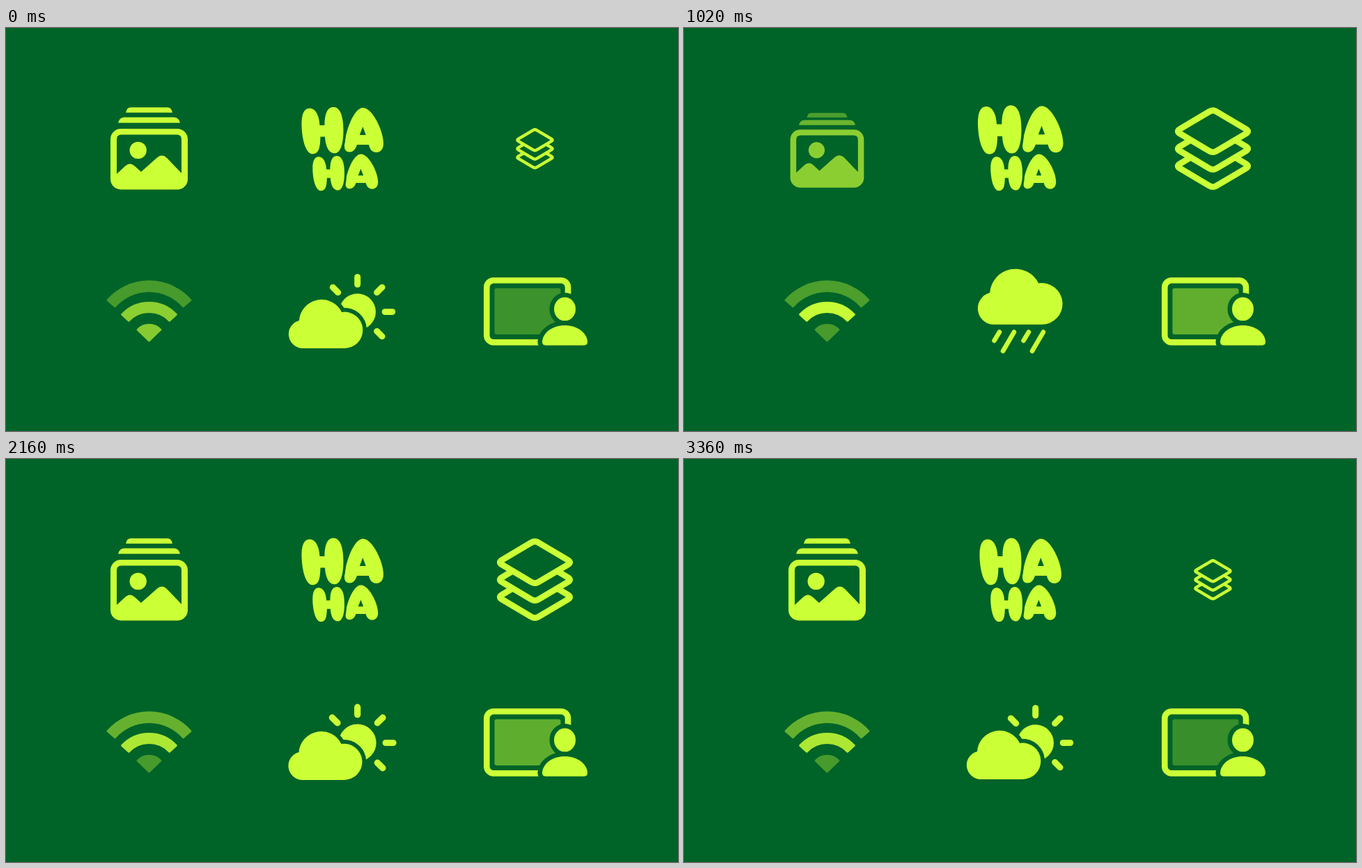
Write an HTML page that moves like this. It is 965 by 580 pixels and loops after 3.39 s.

```html
<!DOCTYPE html>
<html lang="en">
<head>
<meta charset="utf-8">
<title>Icon motion</title>
<style>
  html, body { margin: 0; width: 100%; height: 100%; overflow: hidden; background: #006428; }
  svg { display: block; width: 965px; height: 580px; fill: #cbff36; }
  .bg { fill: #006428; }
  .line { fill: none; stroke: #cbff36; stroke-linecap: round; }
  .gap { stroke: #006428; paint-order: stroke; }
  .sheet { fill: #006428; stroke: #cbff36; stroke-width: 8.8; stroke-linejoin: round; }
  .band { stroke: #cbff36; stroke-width: 3; stroke-linejoin: round; }
</style>
</head>
<body>
<svg viewBox="0 0 965 580">
  <defs>
    <path id="H" d="M424.5 138C424.5 124 428 115.5 436 115.5C445 115.5 450 127 450.5 140H457.5C457.5 125 461 113.8 470 113.8C480 113.8 484.5 127 484.5 147C484.5 168 480 180.3 472 180.3C463 180.3 459 170 458 156.5H451.5C451 171 450 181.3 440 181.3C430 181.3 424.5 158 424.5 138Z"/>
    <path id="A" fill-rule="evenodd" d="M512.8 114.8C526 114.8 542 148 542 166C542 174 538 179 532 179C526 179 522.5 175 521 168H504C502 174 499 178.5 493.5 178.5C488.5 178.5 486 175 486 170C486 155 498 114.8 512.8 114.8ZM512.3 142L507.8 154H516.8Z"/>
    <path id="sheet" d="M-47.5 3.2Q-52.8 0-47.5-3.2L-5.3-28.3Q0-31.5 5.3-28.3L47.5-3.2Q52.8 0 47.5 3.2L5.3 28.3Q0 31.5-5.3 28.3Z"/>
    <path id="ray" d="M0-39.5V-50"/>
  </defs>

  <g class="photo">
    <rect x="150" y="145" width="111" height="87.5" rx="15"/>
    <path class="bg" d="M159 210V160Q159 153.5 165.5 153.5H245.5Q252 153.5 252 160V209L231 187Q224 180.5 217 186.5L194 207L184 198Q178 193 172 198Z"/>
    <circle cx="189.7" cy="176" r="12.2"/>
  </g>
  <path class="photo" d="M161 136.5Q163 128.5 170 128.5H241Q248 128.5 250 136.5Z"/>
  <path class="photo" d="M172 121.7Q173.500 114.3 179 114.3H232Q237.500 114.3 239 121.7Z"/>

  <g class="letter"><use href="#A" transform="translate(487.5 181.6) scale(.835 .78) translate(-486 -114.8)"/></g>
  <g class="letter"><use href="#H" class="gap" stroke-width="8" transform="translate(440.3 184) scale(.762 .745) translate(-424.5 -113.8)"/></g>
  <g class="letter"><use href="#A"/></g>
  <g class="letter"><use href="#H" class="gap" stroke-width="7"/></g>

  <g class="layer"><use href="#sheet" class="sheet" y="25"/></g>
  <g class="layer"><use href="#sheet" class="sheet"/></g>
  <g class="layer"><use href="#sheet" class="sheet" y="-25"/></g>

  <path class="band"/><path class="band"/><path class="band"/>

  <g id="sun">
    <circle r="26.3"/>
    <g class="line" stroke-width="9">
      <use href="#ray" transform="rotate(-45)"/><use href="#ray"/><use href="#ray" transform="rotate(45)"/>
      <use href="#ray" transform="rotate(90)"/><use href="#ray" transform="rotate(135)"/>
    </g>
  </g>
  <path id="drops" class="line" stroke-width="6.5" d="M453 437.500L445.500 450M474 437.500L458 465M495 437.500L487.500 450M516 437.500L500 465"/>
  <path id="cloud" class="gap" stroke-width="11.5" d="M-32.5 35.3A20.4 20.4 0 0 1-38-4.8A32.3 32.3 0 0 1 23.2-16.8A26.2 26.2 0 1 1 27 35.3Z"/>

  <rect class="line" x="690.3" y="363.2" width="116.7" height="89.2" rx="10" stroke-width="8.6"/>
  <rect id="screen" x="701.5" y="374.5" width="95" height="66.5" rx="3"/>
  <g class="gap" stroke-width="13">
    <ellipse cx="802.5" cy="404.5" rx="15.5" ry="17"/>
    <path d="M775 456.7Q770 456.7 770 451.5C771 438 785 428 802.5 428S834 438 835 451.5Q835 456.7 830 456.7Z"/>
  </g>
</svg>
<script>
const LOOP = 3390, HALF = LOOP / 2;
const all = selector => [...document.querySelectorAll(selector)];
const [photo, letters, layers, bands] = [".photo", ".letter", ".layer", ".band"].map(all);
const [sun, drops, cloud, screenFill] = ["#sun", "#drops", "#cloud", "#screen"].map(s => all(s)[0]);

const ramp = (t, start, length) => Math.min(1, Math.max(0, (t - start) / length));
const smooth = u => u * u * (3 - 2 * u);
const back = (u, c = 1.2) => 1 + (c + 1) * (u - 1) ** 3 + c * (u - 1) ** 2;
const wave = u => (1 - Math.cos(Math.PI * u)) / 2;
const mix = (a, b, u) => a + (b - a) * u;
const set = (el, name, value) => el.setAttribute(name, value);
const scaleAt = (el, x, y, s) =>
  set(el, "transform", `translate(${x} ${y}) scale(${s}) translate(${-x} ${-y})`);

// Keys are [time, value] pairs
function keyed(t, keys) {
  let value = keys[0][1];
  for (let i = 1; i < keys.length; i++) {
    const [t0, v0] = keys[i - 1], [t1, v1] = keys[i];
    if (t >= t0) value = mix(v0, v1, smooth(ramp(t, t0, t1 - t0)));
  }
  return value;
}

function wedge(cy, outer, inner, degrees) {
  const a = degrees * Math.PI / 180;
  const at = (r, side) => `${205.5 + side * r * Math.sin(a)} ${cy - r * Math.cos(a)}`;
  return `M${at(outer, -1)}A${outer} ${outer} 0 0 1 ${at(outer, 1)}L${at(inner, 1)}` +
    `A${inner} ${inner} 0 0 0 ${at(inner, -1)}Z`;
}
set(bands[0], "d", wedge(450, 22.7, 0.1, 46));
set(bands[1], "d", wedge(448.5, 53, 40, 47));
set(bands[2], "d", wedge(444, 79.2, 65.5, 48.6));

const upper = [[1000, 1], [1080, 1.25], [1243, 1.25], [1320, .915], [1430, 1.03], [1580, 1]];
const lowerH = [[1030, 1], [1140, 1.22], [1245, 1.16], [1320, 1.01], [1370, .95], [1470, 1.02], [1600, 1]];
const lowerA = [[1170, 1], [1245, 1.06], [1325, 1.13], [1420, .95], [1510, 1.02], [1620, 1]];
const letterKeys = [lowerA, lowerH, upper, upper];
const photoIn = [1259, 1278, 1322];

function draw(t) {
  const p = t % HALF;

  photo.forEach((el, i) => {
    const leave = ramp(p, 980 - 20 * i, 130), enter = p - photoIn[i];
    const shown = enter > 0;
    set(el, "opacity", shown ? ramp(enter, 0, 107) : 1 - leave);
    scaleAt(el, 205.5, 173.3, shown ? mix(.82, 1, back(ramp(enter, 0, 270), 1.7)) : mix(1, .8, smooth(leave)));
  });

  letters.forEach((el, i) => scaleAt(el, 483.5, 174, keyed(p, letterKeys[i])));

  layers.forEach((el, i) => {
    const grow = back(ramp(p, 235 - 15 * i, 220));
    const shrink = smooth(ramp(p, 1245 + 22 * i, 220));
    set(el, "transform", `translate(759.5 173.7) scale(${.5 + .5 * (grow - shrink)})`);
  });

  // The highlight swings between the inner and outer band
  const swing = 2 - 2 * Math.abs((t + 1044) % 1200 / 600 - 1);
  bands.forEach((el, i) => {
    const near = Math.max(0, 1 - Math.abs(swing - i));
    set(el, "opacity", .35 + .65 * wave(near));
  });

  const toRain = ramp(t, 205, 325), toSun = ramp(t, 1895, 325);
  const rain = back(toRain) - back(toSun);
  set(cloud, "transform",
    `translate(${mix(459, 482.6, rain)} ${mix(425.7, 386.5, rain)}) scale(${mix(1, 1.143, rain)})`);
  const sunny = Math.max(0, 1 - rain);
  set(sun, "transform", `translate(504.7 408.5) scale(${sunny})`);
  set(sun, "opacity", Math.min(1, sunny));
  set(drops, "opacity", ramp(toRain, .1, .3) - ramp(toSun, 0, .3));
  set(drops, "transform", `translate(${-12 * (1 - rain)} ${16 * (1 - rain)})`);

  set(screenFill, "opacity", mix(.27, .55, wave((t + 160) / 880)));
}

function frame() {
  draw(performance.now() % LOOP);
  requestAnimationFrame(frame);
}
frame();
</script>
</body>
</html>
```
